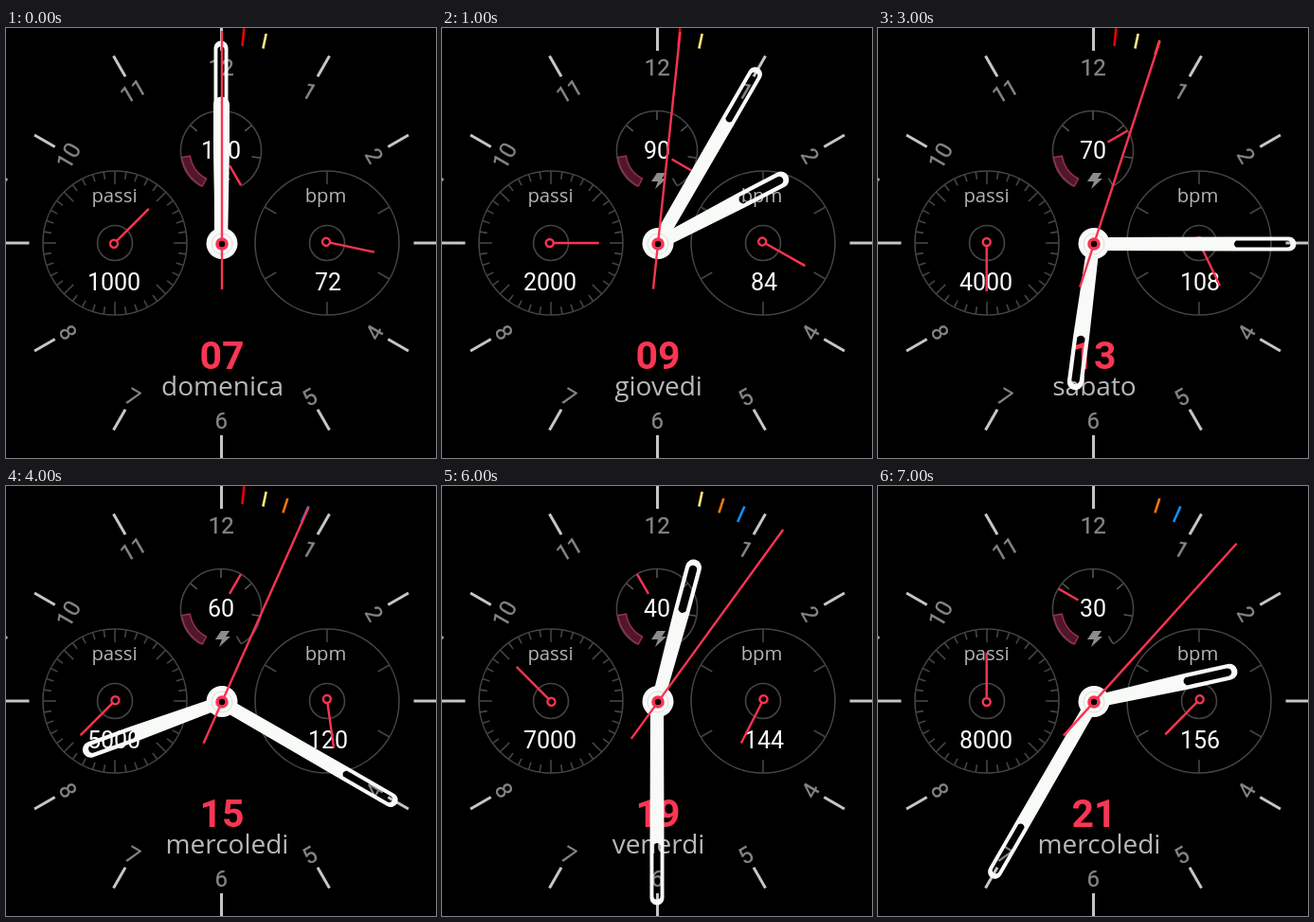
An HTML page for the animation above (8 s loop, 454x454 px).

```html
<!DOCTYPE html>
<html lang="it">
<head>
<meta charset="utf-8">
<title>Watch face</title>
<style>
  html, body { margin: 0; width: 100%; height: 100%; overflow: hidden; background: #000; }
  svg { display: block; width: 100vw; height: 100vh; }
  text { text-anchor: middle; font-family: Roboto, sans-serif; }
  .hour { font-size: 24px; fill: #858585; stroke: #858585; stroke-width: .3; }
  .label { font: 20.3px "Open Sans", sans-serif; fill: #b4b4b4; }
  .value { font-size: 25px; fill: #fff; }
  #date { font-size: 41px; font-weight: 700; fill: #fa3653; }
  #day { font: 28px "Open Sans", sans-serif; fill: #b8b8b8; }
  .dial { fill: none; stroke: #444; stroke-width: 1.6; }
  .needle { fill: none; stroke: #f93453; stroke-width: 2.4; }
  .hand { fill: #f8faf7; fill-rule: evenodd; }
</style>
</head>
<body>
<svg id="face" viewBox="0 0 454 454"></svg>
<script>
const face = document.getElementById('face');
const DAYS = ['domenica', 'lunedi', 'martedi', 'mercoledi', 'giovedi', 'venerdi', 'sabato'];
const STEPS = 8;

function add(tag, attrs, content = '') {
  const el = document.createElementNS('http://www.w3.org/2000/svg', tag);
  for (const name in attrs) el.setAttribute(name, attrs[name]);
  el.textContent = content;
  return face.appendChild(el);
}

const polar = (x, y, r, deg) => {
  const a = deg * Math.PI / 180;
  return [x + r * Math.sin(a), y - r * Math.cos(a)];
};

function tick(x, y, inner, outer, deg, stroke, width) {
  return add('path', {
    d: `M${polar(x, y, inner, deg)}L${polar(x, y, outer, deg)}`,
    stroke, 'stroke-width': width
  });
}

const label = (cls, x, y, content) => add('text', { class: cls, x, y }, content);
const ring = (cx, cy, r) => add('circle', { class: 'dial', cx, cy, r });

// A path drawn pointing up from its pivot; returns a setter for its angle.
function rotor(cls, x, y, d) {
  const el = add('path', { class: cls, d });
  return deg => el.setAttribute('transform', `translate(${x} ${y}) rotate(${deg})`);
}

// Hour ring
add('circle', { cx: 0, cy: 160, r: 1.8, fill: '#aaa' });
for (let h = 1; h <= 12; h++) {
  if (h !== 3 && h !== 9) {
    const [x, y] = polar(227.3, 228, 186.5, h * 30);
    const turn = h > 3 && h < 9 ? h * 30 - 180 : h * 30;
    add('text', { class: 'hour', y: 8.7, transform: `translate(${x} ${y}) rotate(${turn})` }, h);
  }
  tick(227.5, 227, 203, 228, h * 30, '#c6c6c6', 3);
}

// Coloured second marks with the steps between which they are lit
const marks = [
  ['#f00008', 6, 0, 4, 210, 229], ['#ffe680', 12, 0, 6, 211, 227],
  ['#f07810', 18, 3, 7, 210, 226], ['#1090f8', 24, 4, 7, 208, 226]
].map(([color, deg, from, to, inner, outer]) =>
  ({ el: tick(227.5, 228, inner, outer, deg, color, 2.6), from, to }));

// Step counter dial
ring(115, 227, 76);
ring(115, 227, 18.5);
for (let i = 0; i < 40; i++) tick(115, 227, i % 5 ? 68 : 62, 76, i * 9, '#444', 1.6);
label('label', 114.5, 183.5, 'passi');
const stepsText = label('value', 114, 276.5);

// Heart rate dial
ring(339, 227, 76);
ring(339, 227, 18.5);
for (let i = 0; i < 6; i++) tick(339, 227, 62, 76, i * 60, '#444', 1.6);
label('label', 337.5, 183.5, 'bpm');
const bpmText = label('value', 340, 276.5);

// Battery gauge
const at = (r, deg) => polar(227, 130, r, deg);
add('path', { class: 'dial', d: `M${at(42.5, -150)}A42.5 42.5 0 1 1 ${at(42.5, 150)}` });
for (let deg = -150; deg <= 150; deg += 50) tick(227, 130, 33, 42, deg, '#555', 1.6);
add('path', {
  d: `M${at(42, -152)}A42 42 0 0 1 ${at(42, -99)}L${at(33, -99)}A33 33 0 0 0 ${at(33, -152)}Z`,
  fill: '#50162a', stroke: '#96304a', 'stroke-width': 1.5
});
add('path', { d: 'M227 153l9 0-4 6 5 0-12 11 3-8-7 0z', fill: '#8c8c8c' });
const batteryText = label('value', 227, 138);
const turnBattery = rotor('needle', 227, 129.5, 'M0-18V-42');

const dateText = add('text', { id: 'date', x: 228, y: 360 });
const dayText = add('text', { id: 'day', y: 388 });

const needle = 'M0-3V-51M4 1A4 4 0 1 1-4 1A4 4 0 1 1 4 1';
const turnSteps = rotor('needle', 114.7, 227, needle);
const turnBpm = rotor('needle', 339, 226, needle);

// Main hands, each with an open slot near the tip
const turnHour = rotor('hand', 227.5, 228,
  'M-6.5 0L-8.5-100V-147A8.5 8.5 0 0 1 8.5-147V-100L6.5 0Z' +
  'M-4.2-100V-145A4.2 4.2 0 0 1 4.2-145V-100Q0-95-4.2-100Z');
const turnMinute = rotor('hand', 227, 228,
  'M-7 0L-7.5-150V-207A7.5 7.5 0 0 1 7.5-207V-150L7 0Z' +
  'M-3.6-151V-205A3.6 3.6 0 0 1 3.6-205V-151Q0-147-3.6-151Z');
add('circle', { cx: 228, cy: 227.5, r: 16.5, fill: '#f8faf7' });
add('circle', { cx: 228, cy: 228, r: 11, fill: 'none', stroke: '#dcdcdc' });
const turnSecond = rotor('needle', 228, 228, 'M0 48V-225');
add('circle', { cx: 228, cy: 228, r: 5, fill: '#000', stroke: '#f93453', 'stroke-width': 3.6 });

let shown = -1;
function draw(now) {
  requestAnimationFrame(draw);
  const n = Math.floor(now / 1000) % STEPS;
  if (n === shown) return;
  shown = n;

  const day = DAYS[Math.floor(n * 31 / 7) % 7];
  stepsText.textContent = 1000 * (n + 1);
  bpmText.textContent = 72 + 12 * n;
  batteryText.textContent = 100 - 10 * n;
  dateText.textContent = String(7 + 2 * n).padStart(2, '0');
  dayText.textContent = day;
  dayText.setAttribute('x', day === 'mercoledi' ? 233.5 : 228.5);

  turnSteps(45 * (n + 1));
  turnBpm(102 + 17.5 * n);
  turnBattery(150 - 30 * n);
  turnHour(62.5 * n);
  turnMinute(30 * n);
  turnSecond(6 * n);
  for (const { el, from, to } of marks)
    el.setAttribute('visibility', n >= from && n <= to ? 'visible' : 'hidden');
}
draw(performance.now());
</script>
</body>
</html>
```
